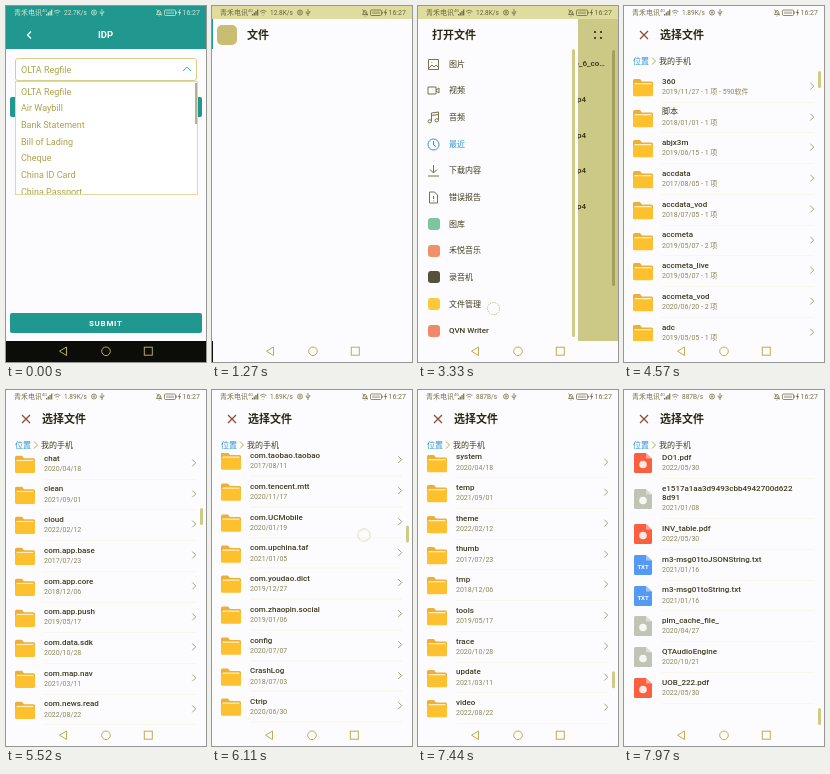
An HTML page that plays this animation: 200x356 px, repeating every 8 s.

```html
<!DOCTYPE html>
<html lang="zh-CN">
<head>
<meta charset="utf-8">
<title>File picker</title>
<style>
@property --s { syntax: '<number>'; inherits: true; initial-value: 0; }
html, body { margin: 0; width: 100%; height: 100%; overflow: hidden; background: #fff; }
#stage { position: absolute; inset: 0; width: 200px; height: 356px; overflow: hidden;
  font: 8px Roboto, 'Noto Sans CJK SC', 'Noto Sans CJK', sans-serif; color: #3f3c1e; }
#stage * { box-sizing: border-box; }
.a, .t, svg { position: absolute; }
.t { line-height: 0; white-space: nowrap; }
.b { font-weight: 700; }
.h { font-size: 11px; font-weight: 700; color: #2b2916; }
svg { overflow: visible; fill: none; stroke: currentColor; }
svg.flat { stroke: none; }
.screen { position: absolute; inset: 0; overflow: hidden; background: #fcfcfe; }
.anim, .screen, #touch { animation: 8s linear infinite; }

/* form */
.teal { background: #20988f; color: #fff; }
.btn { left: 4px; width: 192px; height: 20px; border-radius: 2px; }
#panel { left: 9px; top: 75px; width: 183px; height: 114px; background: #fff; border: 1px solid #dfdb9a;
  overflow: hidden; color: #a9a24a; font-size: 9px; animation-name: panel; }
#chev { animation-name: chev; transform-origin: 181px 63px; }
@keyframes panel { 0%, 2.5% { opacity: 1; } 5%, 99.9% { opacity: 0; } 100% { opacity: 1; } }
@keyframes chev { 0%, 2.5% { transform: none; } 5%, 100% { transform: scaleY(-1); } }

/* recent files and drawer */
#files { animation-name: files; }
#splash { inset: 0; background: #fcfcfe; animation-name: splash; }
#scrim { left: 0; top: 13px; width: 200px; height: 322px; background: #cfcb87; mix-blend-mode: multiply; animation-name: scrim; }
#drawer { left: 0; top: 13px; width: 160px; height: 322px; background: #fcfcfe; animation-name: drawer; }
#press { left: 0; top: 271px; width: 154px; height: 26px; background: #e9e7c4; animation-name: press; }
@keyframes files {
  0%, 10.625% { transform: translateX(200px); animation-timing-function: cubic-bezier(.2,.6,.3,1); }
  15.875%, 16.25% { transform: translateX(1px); }
  16.75%, 100% { transform: none; }
}
@keyframes splash { 0%, 18.75% { opacity: 1; } 22%, 100% { opacity: 0; } }
@keyframes scrim { 0%, 29% { opacity: 0; } 35.1%, 100% { opacity: 1; } }
@keyframes drawer {
  0%, 29% { transform: translateX(-160px); animation-timing-function: cubic-bezier(.2,.6,.3,1); }
  35.1%, 100% { transform: none; }
}
@keyframes press { 0%, 42% { opacity: 0; } 43%, 45% { opacity: 1; } 47%, 100% { opacity: 0; } }

/* picker */
#pick { animation-name: pick; }
#place { animation-name: place; }
#list { left: 0; top: 63px; width: 200px; height: 272px; overflow: hidden; background: #fcfcfe;
  animation-name: show, scroll; }
#crumb { animation-name: show; }
#rows { left: 0; top: 3px; width: 200px; transform: translateY(calc(var(--s) * -1px)); }
#thumb { left: 194px; top: 2px; width: 3px; height: 17px; border-radius: 1.5px; background: #cfcb82;
  transform: translateY(calc(var(--s) * .0632px)); }
.row { position: relative; margin-left: 38px; width: 152px; padding: 4.75px 0 4.75px; border-bottom: 1px solid #f8f7e8; }
.row b { display: block; font-weight: 500; line-height: 9.3px; white-space: pre; }
.row i { display: block; margin-top: 1.95px; font: 7px/9px Roboto, 'Noto Sans CJK SC', 'Noto Sans CJK', sans-serif; color: #8b8858; }
@keyframes pick {
  0%, 44.5% { transform: translateX(200px); animation-timing-function: cubic-bezier(.2,.6,.3,1); }
  50.25%, 100% { transform: none; }
}
@keyframes place { 0%, 52.25% { background: #fcfcfe; } 53%, 100% { background: #efedd2; } }
@keyframes show { 0%, 53.75% { opacity: 0; } 56.25%, 100% { opacity: 1; } }
@keyframes scroll {
  0%, 62.875% { --s: 0; animation-timing-function: ease-in; }
  65.75% { --s: 110; animation-timing-function: cubic-bezier(.2,.5,.4,1); }
  72.625%, 73% { --s: 1000; animation-timing-function: ease-in; }
  76.375%, 76.75% { --s: 1116.5; animation-timing-function: cubic-bezier(.2,.5,.4,1); }
  82.875%, 83.25% { --s: 2206; animation-timing-function: ease-in; }
  86.125%, 86.5% { --s: 2322; animation-timing-function: cubic-bezier(.2,.5,.4,1); }
  93%, 93.5% { --s: 3420; animation-timing-function: ease-in; }
  95% { --s: 3520; animation-timing-function: cubic-bezier(.2,.5,.4,1); }
  99.5%, 100% { --s: 4003; }
}

/* system bars */
#status { left: 0; top: 0; width: 200px; height: 13px; font-size: 6.5px; animation-name: status; }
#speed { left: 58px; top: 2px; height: 10px; width: 28px; overflow: hidden; line-height: 10px; }
#speed div { animation: speed 8s step-end infinite; }
.nav { left: 0; top: 335px; width: 200px; height: 21px; color: #b5b052; background: #fcfcfe; }
@keyframes status {
  0%, 11% { background: #20988f; color: #d3e6cf; }
  11.5%, 46% { background: #dfdc9f; color: #69673f; }
  48%, 100% { background: #fcfcfe; color: #757348; }
}
@keyframes speed {
  0% { transform: none; } 11.25% { transform: translateY(-10px); }
  52.25% { transform: translateY(-20px); } 90% { transform: translateY(-30px); }
}

#touch { position: absolute; left: -6.5px; top: -6.5px; width: 13px; height: 13px; border-radius: 50%;
  border: 1px dotted #bdb75a; animation-name: touch; }
@keyframes touch {
  0%, .375% { opacity: 0; transform: translate(60px,85px); }
  .4%, 1.75% { opacity: 1; transform: translate(60px,85px); }
  1.8%, 6.7% { opacity: 0; transform: translate(100px,101px); }
  6.75%, 7.7% { opacity: 1; transform: translate(100px,101px); }
  7.75%, 27.4% { opacity: 0; transform: translate(18px,29px); }
  27.5%, 28.4% { opacity: 1; transform: translate(18px,29px); }
  28.5%, 41.6% { opacity: 0; transform: translate(75px,302px); }
  41.625%, 42.7% { opacity: 1; transform: translate(75px,302px); }
  42.75%, 52.2% { opacity: 0; transform: translate(60px,81px); }
  52.25%, 53.2% { opacity: 1; transform: translate(60px,81px); }
  53.25%, 62.8% { opacity: 0; transform: translate(148px,250px); }
  62.875% { opacity: 1; transform: translate(148px,250px); animation-timing-function: ease-in; }
  65.75% { opacity: 1; transform: translate(150px,140px); }
  66%, 72.9% { opacity: 0; transform: translate(150px,264px); }
  73% { opacity: 1; transform: translate(150px,264px); animation-timing-function: ease-in; }
  76.375%, 76.75% { opacity: 1; transform: translate(151.5px,144.5px); }
  77%, 83.2% { opacity: 0; transform: translate(142px,264px); }
  83.25% { opacity: 1; transform: translate(142px,264px); animation-timing-function: ease-in; }
  86.125%, 86.5% { opacity: 1; transform: translate(142px,149px); }
  86.7%, 93.4% { opacity: 0; transform: translate(145px,250px); }
  93.5% { opacity: 1; transform: translate(145px,250px); animation-timing-function: ease-in; }
  95% { opacity: 1; transform: translate(145px,150px); }
  95.2%, 100% { opacity: 0; transform: translate(145px,150px); }
}
</style>
</head>
<body>
<div id="stage">
  <div class="screen">
    <div class="a teal" style="left:0;top:0;width:200px;height:43px"></div>
    <svg style="color:#fff" stroke-width="1.2"><path d="M25 25.5l-3.5 3.5 3.5 3.5"/></svg>
    <span class="t b" style="left:92px;top:29px;font-size:9.5px;color:#fff">IDP</span>
    <div class="a" style="left:9px;top:52px;width:182px;height:23px;border:1px solid #d6d184;border-radius:3px;background:#fff"></div>
    <span class="t" style="left:15px;top:63.5px;font-size:9px;color:#a9a24a">OLTA Regfile</span>
    <svg id="chev" class="anim" style="left:0;top:0;color:#43b58a" width="200" height="100"><path d="M177 65l4-4 4 4"/></svg>
    <div class="a btn teal" style="top:91px"></div>
    <div class="a btn teal" style="top:307px"></div>
    <span class="t b" style="left:83px;top:317.5px;letter-spacing:.7px;color:#fff">SUBMIT</span>
    <div id="panel" class="a anim"><div class="a" style="left:179px;top:1px;width:3px;height:41px;background:#b2b092"></div></div>
    <div class="a nav" style="background:#0c0c08"></div>
  </div>

  <div id="files" class="screen">
    <svg stroke-width="1.2"><path d="M14 25.5h11M14 29h11M14 32.5h11"/></svg>
    <span class="t h" style="left:36px;top:30px">最近</span>
    <div id="recent"></div>
    <svg class="flat"><g fill="#34321c"><circle cx="177" cy="26" r="1.1"/><circle cx="183" cy="26" r="1.1"/><circle cx="177" cy="32" r="1.1"/><circle cx="183" cy="32" r="1.1"/></g></svg>
    <div class="a" style="left:194px;top:44px;width:3px;height:236px;border-radius:2px;background:#c9c9b4"></div>
    <div id="splash" class="a anim">
      <div class="a" style="left:4px;top:19px;width:20px;height:20px;border-radius:5px;background:#c8bd72"></div>
      <span class="t h" style="left:34px;top:30px">文件</span>
    </div>
    <div id="scrim" class="a anim"></div>
    <div id="drawer" class="a anim">
      <div id="press" class="a anim"></div>
      <span class="t h" style="left:14px;top:17px">打开文件</span>
      <div class="a" style="left:154px;top:30px;width:3px;height:288px;border-radius:1.5px;background:#cfcb86"></div>
    </div>
    <div class="a nav"></div>
  </div>

  <div id="pick" class="screen">
    <svg stroke-width="1.2" style="color:#8d4a33"><path d="M16 25l8 8M24 25l-8 8"/></svg>
    <span class="t h" style="left:36px;top:30.3px">选择文件</span>
    <span class="t" style="left:9px;top:55.7px;color:#2a93cf">位置</span>
    <div id="crumb" class="anim">
      <svg style="left:0;top:0;color:#b5ae4e"><path d="M28 51.5l3.5 3.5-3.5 3.5"/></svg>
      <span class="t" style="left:35px;top:55.7px">我的手机</span>
    </div>
    <div id="place" class="a anim" style="left:0;top:66px;width:200px;height:30px">
      <svg style="color:#8b8858"><rect x="14" y="7" width="10" height="17" rx="1.5"/><path d="M17.5 21.5h3M186 11.5l3.5 3.5-3.5 3.5"/></svg>
      <span class="t" style="left:38px;top:15.7px">我的手机</span>
    </div>
    <div id="list" class="a anim"><div id="rows" class="a"></div><div id="thumb" class="a"></div></div>
    <div class="a nav"></div>
  </div>

  <div id="status" class="a anim">
    <span class="t" style="left:8px;top:7px;font-size:7px">青禾电讯</span>
    <span class="t" style="left:36px;top:5px;font-size:4px">4G</span>
    <svg stroke-width="1.2" width="200" height="13">
      <path d="M40.6 9.5v-1.5M42.3 9.5V6.5M44 9.5V5M45.7 9.5V3.5"/>
      <g stroke-width=".8"><path d="M48 5.5q3.2-2.6 6.4 0M49.4 7.2q1.8-1.5 3.6 0M51.2 9v.6"/>
      <circle cx="88" cy="6.5" r="2.5"/><circle cx="88" cy="6.5" r=".8"/>
      <path d="M96 3v7M94.2 5.5v1.5l1.8 1 1.8-1.5V5"/>
      <path d="M150.5 8.5q1-1 1-3 1.5-2.5 3 0 0 2 1 3zM152.5 10h1M150.5 3.5l5 6"/>
      <rect x="158.5" y="4" width="11" height="5.5" rx="1"/><path d="M170.6 5.7v2M161 5.5v2.5M163 5.5v2.5M165 5.5v2.5M167 5.5v2.5"/></g>
      <path d="M174 3l-2 4h1.3l-.6 3.5 2.3-4.5h-1.4l.9-3z" fill="currentColor" style="stroke:none"/>
    </svg>
    <div id="speed" class="a"><div>22.7K/s<br>12.8K/s<br>1.89K/s<br>887B/s</div></div>
    <span class="t" style="left:176.5px;top:7px;font-size:7px">16:27</span>
  </div>
  <div id="touch"></div>
</div>

<script>
const $ = id => document.getElementById(id);
const add = (el, html) => el.insertAdjacentHTML('beforeend', html);
const text = (x, y, s, css = '') => `<span class="t" style="left:${x}px;top:${y}px;${css}">${s}</span>`;

document.querySelectorAll('.nav').forEach(n => add(n,
  '<svg><path d="M60.5 6v8.5L53.5 10.2z"/><circle cx="100" cy="10.3" r="4.3"/><rect x="138.3" y="6.2" width="8" height="8"/></svg>'));

['OLTA Regfile', 'Air Waybill', 'Bank Statement', 'Bill of Lading', 'Cheque', 'China ID Card', 'China Passport']
  .forEach((s, i) => add($('panel'), text(5, 9.5 + i * 16.7, s)));

// recent list
for (let i = 0; i < 8; i++) {
  const y = 58 + i * 35.8;
  const name = i ? `record-2022-06-${20 - i}-1546.mp4` : 'record-2022-06-16-1536_6_co…';
  const pos = i < 5 ? `right:${i ? 32 : 13}px` : 'left:40px';
  add($('recent'), `<div class="a" style="left:9px;top:${y - 6}px;width:22px;height:22px;border-radius:3px;background:#d9d7c0"></div>
    <span class="t" style="${pos};top:${y}px;font-weight:500">${i < 5 ? name : 'note-' + i + '.txt'}</span>`);
}

// drawer entries: label, then an outline or a tile colour
const doc = 'M2.5 1h5l3 3v8h-8z';
[['图片', 'M1.5 1.5h10v10h-10zM2 10l3-3 2 2 2-2 2.5 2.5M4.5 4.5h.8'],
 ['视频', 'M1 3h8v7H1zM9 6l3-2v5l-3-2'],
 ['音频', 'M4.5 10V2l7-1v8M4.5 4.5l7-1M1 10.3a1.7 1.5 0 1 0 3.5 0a1.7 1.5 0 1 0-3.5 0M8 9.3a1.7 1.5 0 1 0 3.5 0a1.7 1.5 0 1 0-3.5 0'],
 ['最近', 'M1 6.5a5.5 5.5 0 1 0 11 0a5.5 5.5 0 1 0-11 0M6.5 3v4l2.5 1.5'],
 ['下载内容', 'M6.5 1v8M3 5.5L6.5 9 10 5.5M1 12h11'],
 ['错误报告', doc + 'M6.5 5v3M6.5 9.5v.8'],
 ['图库', '#7fc4a0'], ['禾悦音乐', '#f0906a'], ['录音机', '#55523c'], ['文件管理', '#fbc93a'], ['QVN Writer', '#f08a6a']
].forEach(([label, art], i) => {
  const y = 45 + i * 26.67, on = i === 3 ? 'color:#2a93cf;' : '';
  add($('drawer'), text(31, y + .5, label, on + 'font-weight:500'));
  add($('drawer'), art[0] === '#'
    ? `<div class="a" style="left:9.5px;top:${y - 6}px;width:12px;height:12px;border-radius:3px;background:${art}"></div>`
    : `<svg style="left:9px;top:${y - 6.5}px;${on || 'color:#77744a'}" width="13" height="13"><path d="${art}"/></svg>`);
});

// picker rows: name=date, the date is seeded where none is given
const names = `360=2019/11/27 - 1 项 - 590软件,脚本=2018/01/01 - 1 项,abjx3m=2019/06/15 - 1 项,accdata=2017/08/05 - 1 项,accdata_vod=2018/07/05 - 1 项,accmeta=2019/05/07 - 2 项,accmeta_live=2019/05/07 - 1 项,accmeta_vod=2020/06/20 - 2 项,adc=2019/05/05 - 1 项,
alog,Android,app_bin,app_log,appcache,Audiobooks,backup,backups,baselog,bin,bitmap,book,browser,bugreport,bundle,cache,camera,cdata,chat,clean,cloud,com.app.base,com.app.core,com.app.push,com.data.sdk,com.map.nav,com.news.read,
com.taobao.taobao=2017/08/11,com.tencent.mtt=2020/11/17,com.UCMobile=2020/01/19,com.upchina.taf=2021/01/05,com.youdao.dict=2019/12/27,com.zhaopin.social=2019/01/06,config=2020/07/07,CrashLog=2018/07/03,Ctrip=2020/06/30,
data,data_app,DCIM,debug,dict,Documents,Download,dump,emoji,export,face,files,font,game,gif,guide,home,http,icons,image,imgcache,index,journal,kernel,lib,libs,log,logs,map,media,Movies=2020/12/02,
MQ=2017/05/18,msc=2021/12/31,mtdownload=2021/08/27,Music=2022/06/08,nav=2019/07/14,nDTD=2017/10/15,netease=2019/12/11,nk_download=2019/08/15,Notifications,
offline,page,patch,pic,Pictures,player,plugin,Podcasts,print,push,qrcode,radio,read,record,recovery,res,Ringtones,save,scan,sdk,share,skin,sound,splash,store,sync,system,temp,theme,thumb,tmp,tools,trace,update,video,voice,web,
1.txt,2.txt,a.log,app.txt,b.txt,cfg.txt,dat_1,dat_2,
DO1.pdf=2022/05/30,e1517a1aa3d9493cbb4942700d622|8d91=2021/01/08,INV_table.pdf=2022/05/30,m3-msg01toJSONString.txt=2021/01/16,m3-msg01toString.txt=2021/01/16,plm_cache_file_=2020/04/27,QTAudioEngine=2020/10/21,UOB_222.pdf=2022/05/30`
  .replace(/\n/g, '').split(',');

const firstFile = 122;
const pad = n => String(n).padStart(2, '0');
const someDate = i => `${2017 + i * 7 % 6}/${pad(1 + i * 5 % 12)}/${pad(1 + i * 11 % 28)}`;
const folder = `<svg class="flat" style="left:-29px;top:7px"><path d="M0 1.5Q0 0 1.5 0H7l2 2.5h9.5q1.5 0 1.5 1.500v5H0z" fill="#efae38"/><path d="M1.500 4h17v4h-17z" fill="#fff0b8"/><rect y="5.2" width="20" height="12" rx="1.500" fill="#fdc02e"/></svg>
  <svg style="left:0;top:0;color:#a5a27a"><path d="M148.3 10.7l3.4 3.4-3.4 3.4"/></svg>`;
const file = (fill, mark) => `<svg class="flat" style="left:-28px;top:calc(50% - 10px)"><path d="M1.5 0H12l6 5.5v13q0 1.5-1.5 1.5h-15Q0 20 0 18.5v-17Q0 0 1.5 0z" fill="${fill}"/><path d="M12 0l6 5.5h-6z" fill="#fff" opacity=".45"/>${mark}</svg>`;
const dot = '<circle cx="9" cy="11.500" r="3.8" fill="#fff" opacity=".85"/>';

function icon(name, i) {
  if (i < firstFile) return folder;
  if (name.endsWith('.pdf')) return file('#fa6040', dot);
  if (name.endsWith('.txt')) return file('#559af2', '<text x="9" y="14" text-anchor="middle" font-size="6" font-weight="700" fill="#fff">TXT</text>');
  return file('#c0c4b4', dot);
}

add($('rows'), names.map((entry, i) => {
  const [name, date] = entry.split('=');
  return `<div class="row">${icon(name, i)}<b>${name.replace('|', '\n')}</b><i>${date || someDate(i)}</i></div>`;
}).join(''));
</script>
</body>
</html>
```
